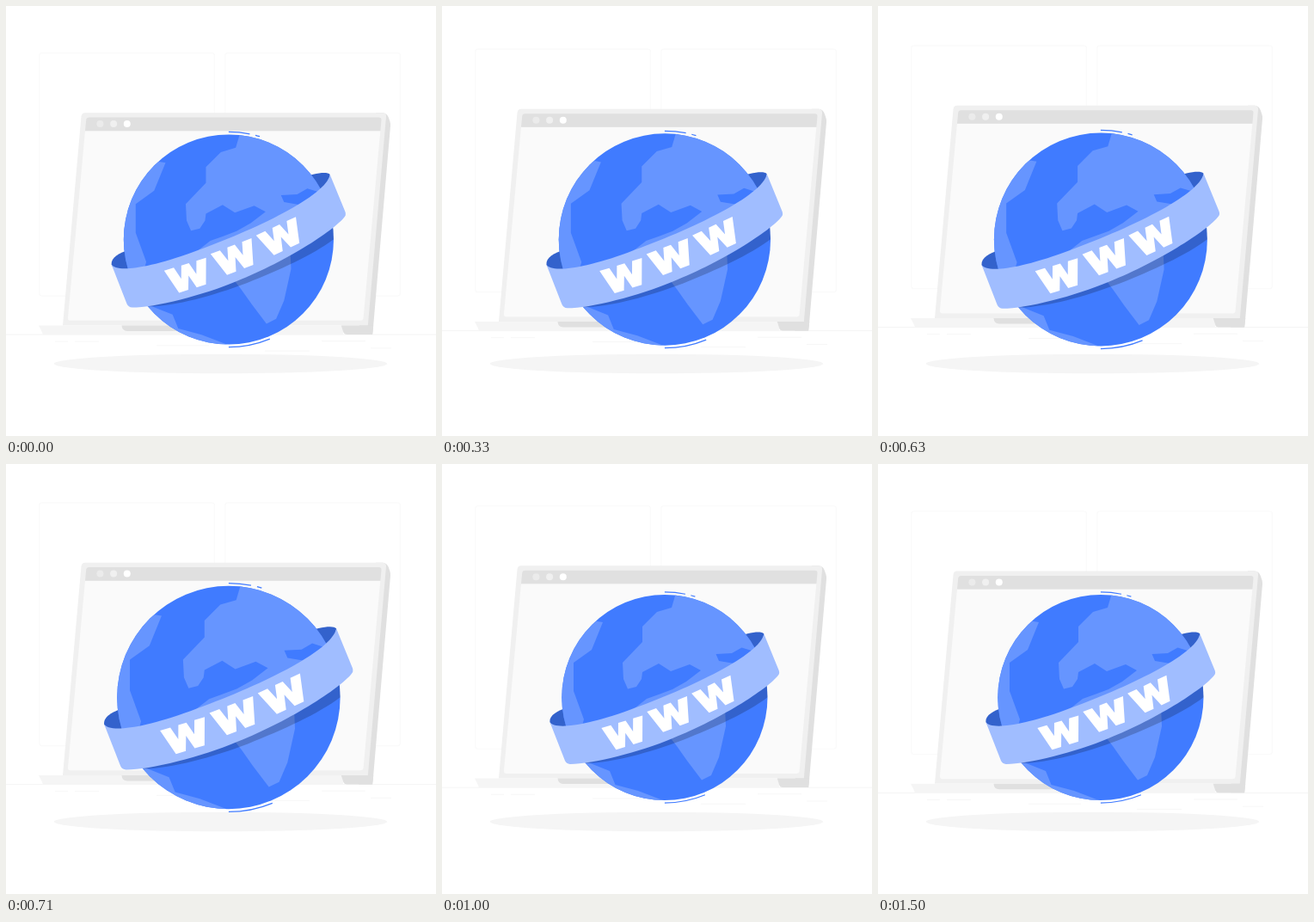
An HTML page with a canvas for the animation above (1.54 s loop, 500 px wide and 500 px high).

```html
<!DOCTYPE html>
<html lang="en">
<head>
<meta charset="utf-8">
<title>WWW globe</title>
<style>
  html, body { margin: 0; width: 100%; height: 100%; overflow: hidden; background: #fff; }
  canvas { display: block; width: 500px; height: 500px; }
</style>
</head>
<body>
<canvas id="stage" role="img" aria-label="WWW"></canvas>
<script>
const LOOP = 1540, CYCLE = 1500, LEAD = 30;
const CENTER = [258.9, 271.5], RADIUS = 119.6;
const BLUE = '#407bff', LAND = '#6695ff', RIBBON = '#a0bdff', RIBBON_BACK = '#3362cc';
const GRAY = '#e0e0e0', FRAME = '#f0f0f0', PALE = '#f5f5f5', SCREEN = '#fafafa';

const canvas = document.getElementById('stage');
const ctx = canvas.getContext('2d');
const ratio = window.devicePixelRatio || 1;
canvas.width = canvas.height = 500 * ratio;

// Piecewise linear value through [position, value] stops.
function interpolate(stops, p) {
  for (let i = 1; i < stops.length; i++) {
    const [a, u] = stops[i - 1], [b, v] = stops[i];
    if (p <= b) return u + (v - u) * (p - a) / (b - a);
  }
  return stops[stops.length - 1][1];
}

const FLOAT = [[0, 0], [.5, -10], [1, 0]];
const BEAT = [[0, 1], [.1, 1.1], [.3, 1], [.4, 1], [.5, 1.09], [.6, 1], [1, 1]];

function fill(path, color) {
  ctx.fillStyle = color;
  ctx.fill(new Path2D(path));
}

function stroke(path, color, width) {
  ctx.strokeStyle = color;
  ctx.lineWidth = width;
  ctx.stroke(new Path2D(path));
}

function disc(x, y, r, color) {
  ctx.fillStyle = color;
  ctx.beginPath();
  ctx.arc(x, y, r, 0, Math.PI * 2);
  ctx.fill();
}

function drawRoom() {
  ctx.strokeStyle = SCREEN;
  ctx.lineWidth = 1.2;
  for (const x of [38.8, 254.8]) {
    ctx.beginPath();
    ctx.roundRect(x, 55, 203.6, 282.5, 3);
    ctx.stroke();
  }
  stroke('M0 382.4H500', '#f1f1f1', .8);
  stroke('M57 390.5H72M80 390.5H108M175 395.3H236M301 401.5H353M367 390H418M424 398.3H448', PALE, .8);
}

function drawLaptop() {
  // Thick side of the lid
  fill('M430 124.6H438Q443 125 444.8 130L446.5 135Q447.2 137 447 140L427 374L426 382.3H410Z', GRAY);
  fill('M92 124.6H438Q442.3 124.6 442 129L420.8 371.8H66L87.5 129Q88 124.6 92 124.6Z', FRAME);
  fill('M92 145.6H435.3L415.6 363Q415.3 366.2 412 366.2H75Q71.6 366.2 72 362.6Z', SCREEN);
  fill('M96.5 130H433.5Q436.8 130 436.5 133L435.4 145.6H92L93.2 133Q93.6 130 96.5 130Z', GRAY);
  disc(109.4, 137.5, 4, '#ebebeb');
  disc(125.1, 137.5, 4, FRAME);
  disc(140.8, 137.5, 4, '#fff');
  fill('M38 371.8H392V382.3H43Q41.5 378 38 371.8Z', PALE);
  fill('M134.5 371.8H300Q299 378.3 293 378.3H141Q135 378.3 134.5 371.8Z', GRAY);
  fill('M389.8 371.8H427.2L426.2 382.3H396Q393.2 382.3 392.4 380Z', GRAY);
}

function drawLand() {
  fill('M130 183H181L187 184L174 216L153 231V264L165 297L160 315H130Z', LAND);
  fill('M272 150L267 167L250 172L233 189V207L210 231L211 250L216 261.5L226 259L232 250L233 242'
    + 'L252 232L266 241L288 233L301 240L284 253L268 262L252 268L238 273L224 284L300 275L385 240V150Z', LAND);
  fill('M318.5 221L337 220L348.5 213.5L360 217L340 232L322 229Z', BLUE);
  fill('M263 315L273 328L285 345L302 367.5L313 362L322 341L330 305L329 282Z', LAND);
  fill('M160 343L180 351L195 357L201.5 373L228 380L258 391.5L220 400L150 380Z', LAND);
}

function drawGlobe() {
  const [cx, cy] = CENTER;
  fill('M125.4 300C124.5 292 135 286.5 145 283.5L160 306L135 306Q127 305 125.4 300Z', RIBBON_BACK);
  fill('M340 202C356 196 371 193.5 374.3 197.5C374 207 366 213 350 230Z', RIBBON_BACK);

  disc(cx, cy, RADIUS, BLUE);
  ctx.save();
  ctx.beginPath();
  ctx.arc(cx, cy, RADIUS, 0, Math.PI * 2);
  ctx.clip();
  drawLand();
  fill('M150 335L268 300L392 235L384 267C360 287 320 305 280 321C240 336 200 347 168 348Z', 'rgba(0,0,0,.2)');
  ctx.restore();

  fill('M125.4 300C130 308 160 307 218 286C290 260 370 222 374.3 197.5L391.7 240Q392.5 242 392 244'
    + 'C384 258 326 296 268 319C230 335 175 349 149 349Q144.5 348.5 143 345Z', RIBBON);
  drawLettering();

  ctx.strokeStyle = BLUE;
  ctx.lineWidth = 1.2;
  for (const [from, to] of [[-90, -78.7], [-75.6, -73.2], [67.5, 90]]) {
    ctx.beginPath();
    ctx.arc(cx, cy, 122.6, from * Math.PI / 180, to * Math.PI / 180);
    ctx.stroke();
  }
}

// The same wide W, set three times along the ribbon.
function drawLettering() {
  const glyph = 'M-25 -14.5H-13.5L-9 0L-4.5 -14.5H4.5L9 0L13.5 -14.5H25L16 14.5H5L0 -1L-5 14.5H-16Z';
  for (const [x, y, angle] of [[213.5, 313.6, -17], [266.8, 292.6, -21], [318.9, 269.4, -25]]) {
    ctx.save();
    ctx.translate(x, y);
    ctx.rotate(angle * Math.PI / 180);
    fill(glyph, '#fff');
    ctx.restore();
  }
}

function draw(time) {
  const phase = Math.min((time % LOOP + LEAD) / CYCLE, 1);
  const scale = interpolate(BEAT, phase);
  const lift = interpolate(FLOAT, phase);
  ctx.setTransform(ratio, 0, 0, ratio, 0, 0);
  ctx.fillStyle = '#fff';
  ctx.fillRect(0, 0, 500, 500);

  ctx.fillStyle = PALE;
  ctx.beginPath();
  ctx.ellipse(249.5, 416, 193.7, 11.3, 0, 0, Math.PI * 2);
  ctx.fill();

  ctx.save();
  ctx.translate(0, lift);
  drawRoom();
  drawLaptop();
  ctx.restore();

  ctx.save();
  ctx.translate(...CENTER);
  ctx.scale(scale, scale);
  ctx.translate(-CENTER[0], -CENTER[1]);
  drawGlobe();
  ctx.restore();
}

const start = performance.now();
function tick() {
  draw(performance.now() - start);
  requestAnimationFrame(tick);
}
tick();
</script>
</body>
</html>
```
